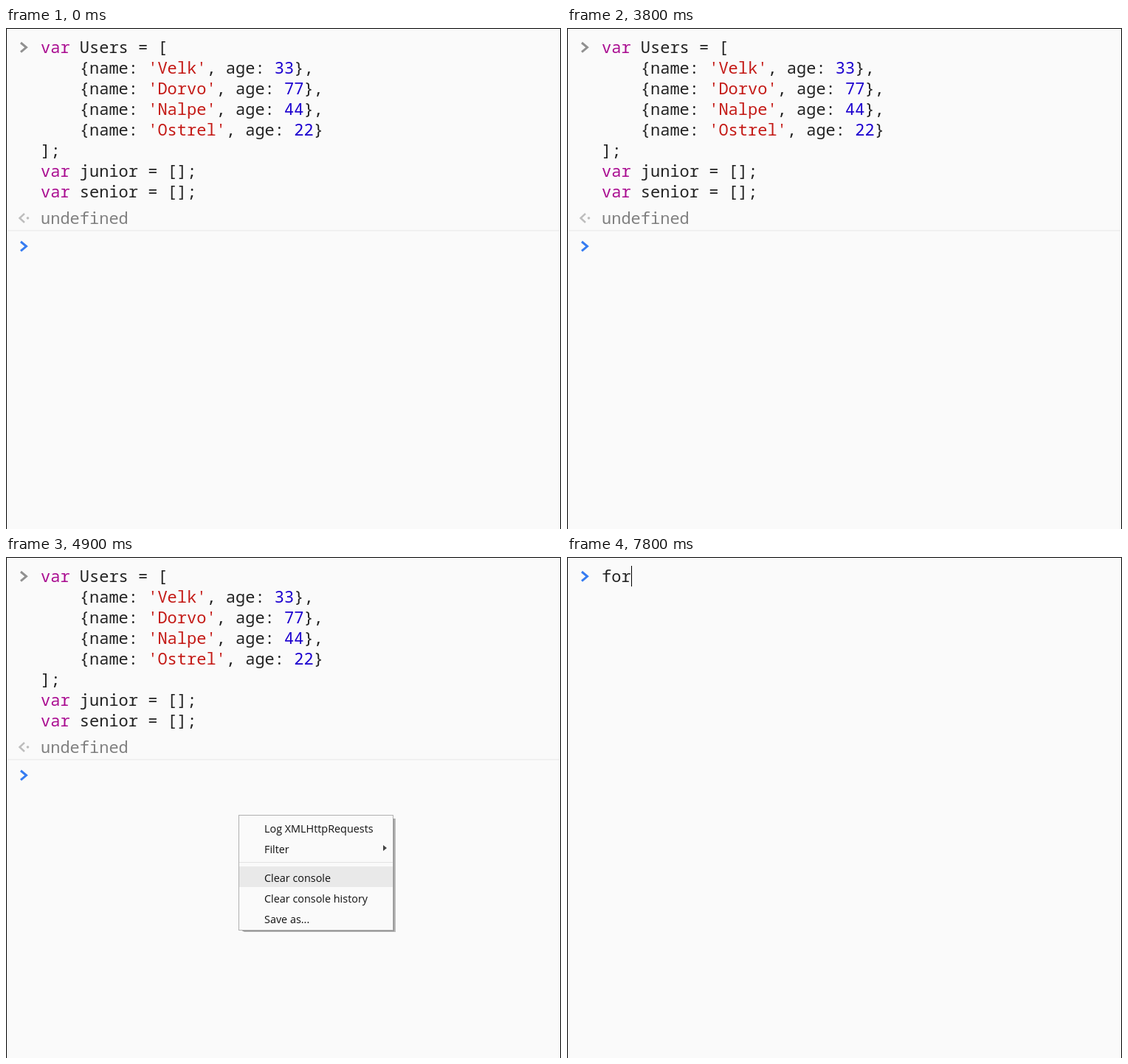
An HTML page that plays this animation: 752 px wide and 680 px high, repeating every 8000 ms.

```html
<!DOCTYPE html>
<html lang="en">
<head>
<meta charset="utf-8">
<title>Console</title>
<style>
  html, body { margin: 0; width: 100%; height: 100%; overflow: hidden; background: #fafafa; }
  svg { display: block; width: 752px; height: 680px; }
  text { white-space: pre; }
  .mono { font: 22px "Noto Sans Mono", monospace; fill: #222; }
  .key { fill: #aa0d91; }
  .str { fill: #c41a16; }
  .num { fill: #1c00cf; }
  .chevron { fill: none; stroke-width: 3; }
  #menu text { font: 14.4px "Open Sans", sans-serif; fill: #111; }

  /* One 8 s timeline; every change is a hard cut. */
  #log, #menu, #hover, #prompt, #caret, .typed {
    animation: 8s step-end infinite;
  }
  #log { animation-name: log; }
  #menu { animation-name: menu; }
  #hover { animation-name: hover; }
  #prompt { animation-name: prompt; }
  #caret { animation-name: blink, advance; }
  .typed { animation-name: type1; }
  .typed + .typed { animation-name: type2; }
  .typed + .typed + .typed { animation-name: type3; }

  @keyframes log { 0% { visibility: visible } 71.25%, 100% { visibility: hidden } }
  @keyframes menu {
    0%, 71.25%, 100% { visibility: hidden }
    56.25% { visibility: visible }
  }
  @keyframes hover {
    0%, 71.25%, 100% { visibility: hidden }
    61.25% { visibility: visible }
  }
  @keyframes prompt {
    0% { transform: translateY(270px) }
    71.25%, 100% { transform: translateY(0) }
  }
  @keyframes blink {
    0%, 22.5%, 35%, 47.5%, 55%, 86.25% { visibility: hidden }
    17.5%, 28.75%, 41.25%, 53.75%, 80%, 92.5%, 100% { visibility: visible }
  }
  @keyframes advance {
    0% { transform: translateX(0) }
    95% { transform: translateX(13px) }
    96.25% { transform: translateX(26px) }
    97.5%, 100% { transform: translateX(40px) }
  }
  @keyframes type1 { 0% { visibility: hidden } 95%, 100% { visibility: visible } }
  @keyframes type2 { 0% { visibility: hidden } 96.25%, 100% { visibility: visible } }
  @keyframes type3 { 0% { visibility: hidden } 97.5%, 100% { visibility: visible } }
</style>
</head>
<body>
<svg viewBox="0 0 752 680">
  <rect width="752" height="680" fill="#fafafa"/>

  <g id="log">
    <path class="chevron" stroke="#919191" d="M20 20l7.5 6.3L20 32.6"/>
    <g class="mono">
      <text x="47" y="34"><tspan class="key">var</tspan> Users = [</text>
      <text x="47" y="62">    {name: <tspan class="str">'Velk'</tspan>, age: <tspan class="num">33</tspan>},</text>
      <text x="47" y="90">    {name: <tspan class="str">'Dorvo'</tspan>, age: <tspan class="num">77</tspan>},</text>
      <text x="47" y="118">    {name: <tspan class="str">'Nalpe'</tspan>, age: <tspan class="num">44</tspan>},</text>
      <text x="47" y="146">    {name: <tspan class="str">'Ostrel'</tspan>, age: <tspan class="num">22</tspan>}</text>
      <text x="47" y="174">];</text>
      <text x="47" y="202"><tspan class="key">var</tspan> junior = [];</text>
      <text x="47" y="230"><tspan class="key">var</tspan> senior = [];</text>
      <text x="47" y="266" style="fill:#808080">undefined</text>
    </g>
    <path class="chevron" stroke="#bdbdbd" style="stroke-width:2.4" d="M25 252l-6.5 6 6.5 6"/>
    <circle cx="29.5" cy="258" r="1.8" fill="#bdbdbd"/>
    <rect x="1" y="274" width="750" height="2" fill="#f0f0f0"/>
  </g>

  <g id="prompt">
    <path class="chevron" stroke="#367cf1" d="M20 20l7.5 6.3L20 32.6"/>
    <text class="mono" x="47" y="34"><tspan class="typed">f</tspan><tspan class="typed">o</tspan><tspan class="typed">r</tspan></text>
    <rect id="caret" x="47" y="12" width="1" height="28" fill="#000"/>
  </g>

  <g id="menu">
    <path fill="#bbb" d="M320 507h205V355h3v154H323z"/>
    <path fill="#8f8f8f" d="M320 507h205V355h1v153H321z"/>
    <rect x="315.5" y="350.5" width="209" height="156" fill="#fafafa" stroke="#b0b0b0"/>
    <rect x="316" y="414" width="208" height="1" fill="#e2e2e2"/>
    <rect id="hover" x="316" y="420" width="208" height="28" fill="#e9e9e9"/>
    <text x="350" y="374">Log XMLHttpRequests</text>
    <text x="350" y="402">Filter</text>
    <text x="350" y="441">Clear console</text>
    <text x="350" y="469">Clear console history</text>
    <text x="350" y="497">Save as...</text>
    <path fill="#444" d="M511 391l5 4-5 4z"/>
  </g>

  <path fill="none" stroke="#000" d="M.5 680V.5h751V680"/>
</svg>
</body>
</html>
```
